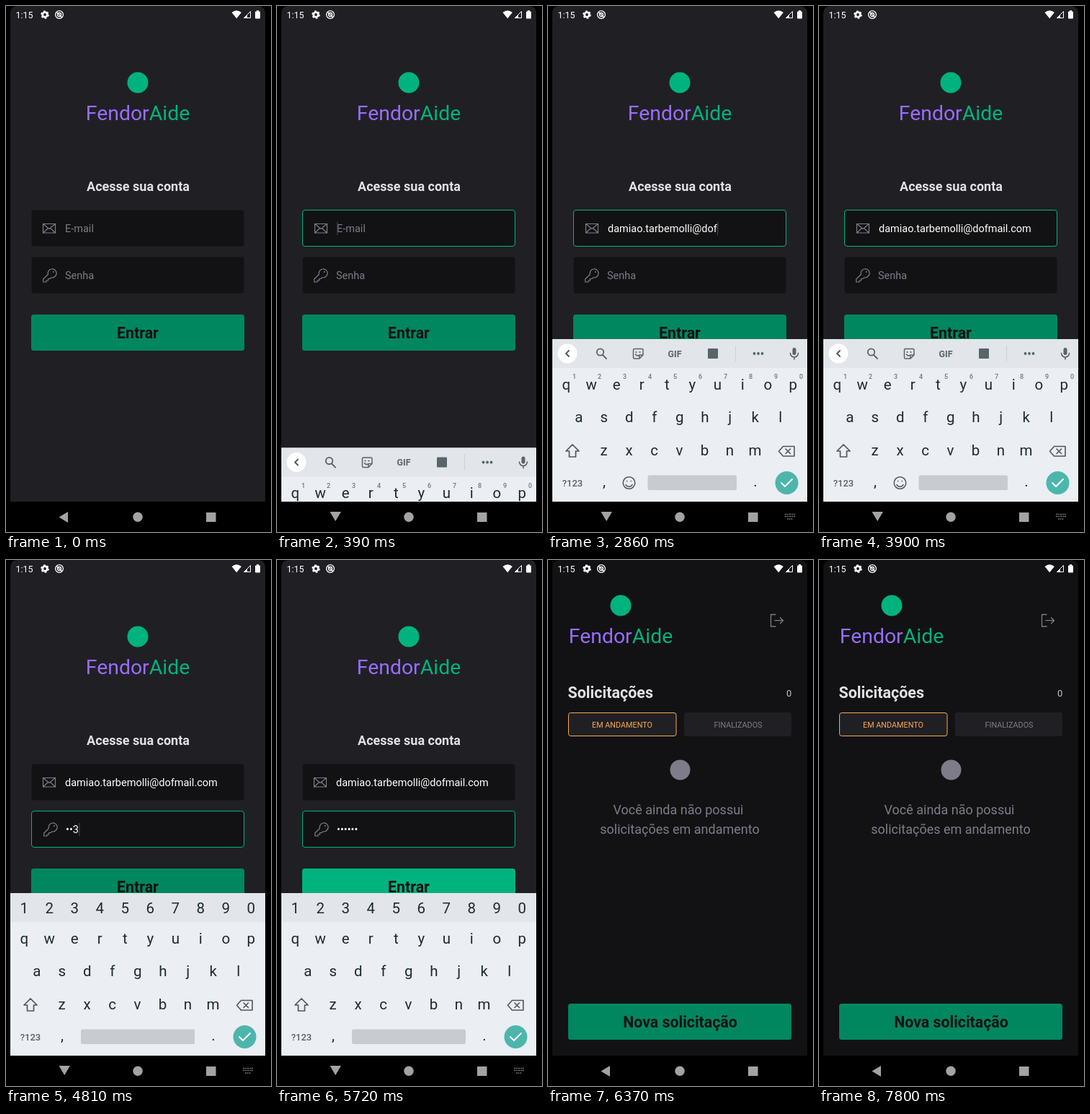
An HTML page for the animation above (8000 ms loop, 368 by 728 pixels).

```html
<!DOCTYPE html>
<html lang="pt-BR">
<head>
<meta charset="utf-8">
<title>Login</title>
<style>
  html, body { margin: 0; width: 100%; height: 100%; overflow: hidden; background: #000; }
  svg { display: block; width: 368px; height: 728px; font-family: Roboto, sans-serif; }
  .mid { text-anchor: middle; }
  .bold { font-weight: 700; }
  .brand { font-size: 28.4px; }
  .field { font-size: 14.5px; }
  .button { font-size: 21.3px; font-weight: 700; fill: #121214; }
  .tab { font-size: 10.8px; }
  .empty { font-size: 18px; }
  .key { font-size: 20.5px; fill: #1f2a30; }
  .hint { font-size: 9px; font-weight: 500; fill: #6d777d; }
  .small { font-size: 13px; font-weight: 500; fill: #566168; }
  .suggest { font-size: 16.4px; fill: #59646b; }
  .line { fill: none; stroke-linecap: round; stroke-linejoin: round; }
</style>
</head>
<body>
<svg viewBox="0 0 368 728">
  <defs>
    <clipPath id="screen"><path d="M6 686V11Q6 0 17 0H349Q360 0 360 11V686Z"/></clipPath>
    <g id="brand">
      <circle cx="183" cy="106" r="14.5" fill="#00b37e"/>
      <text class="brand mid" x="183" y="158"><tspan fill="#996dff">Fendor</tspan><tspan fill="#00b37e">Aide</tspan></text>
    </g>
  </defs>
  <rect width="368" height="728"/>

  <g clip-path="url(#screen)">
    <g id="login">
      <rect x="6" width="354" height="686" fill="#202024"/>
      <use href="#brand"/>
      <text class="mid bold" x="183.5" y="256" font-size="18" fill="#e1e1e6">Acesse sua conta</text>

      <rect id="emailBox" x="35.5" y="282.5" width="295" height="50" rx="3.5" fill="#121214"/>
      <g id="emailRow">
        <path class="line" d="M51.5 301.500h17v12.500h-17zl8.500 7 8.500-7M51.500 314l6.500-6M68.500 314l-6.500-6" stroke="#7c7c8a" stroke-width="1.2"/>
        <text id="email" class="field" x="82" y="313.300"></text>
      </g>

      <rect id="passBox" x="35.5" y="347.5" width="295" height="50" rx="3.5" fill="#121214"/>
      <g id="passRow">
        <path class="line" d="M58.300 371.500a6 6 0 1 1 4.400 4.300l-1.700 1.700h-2.500v2.500h-2.500v2h-4.300v-4z" stroke="#7c7c8a" stroke-width="1.2"/>
        <circle cx="65.800" cy="368" r="1" fill="#7c7c8a"/>
        <text id="pass" class="field" x="82" y="378.300"></text>
      </g>
      <rect id="underline" x="83" y="315" height="1" fill="#d5d5da"/>
      <rect id="cursor" width="1.2" height="18" fill="#3d4257"/>

      <rect id="enter" x="35" y="427" width="296" height="50" rx="3.5"/>
      <text class="button mid" x="183" y="460">Entrar</text>
    </g>

    <g id="home">
      <rect x="6" width="354" height="686" fill="#121214"/>
      <use href="#brand" x="-82" y="-43"/>
      <path class="line" d="M316 75.500h-6.500v16.500h6.500M315 83.700h11.500m-4-4 4 4-4 4" stroke="#7c7c8a" stroke-width="1.3"/>
      <text class="bold" x="27.500" y="191" font-size="21.5" fill="#e1e1e6">Solicitações</text>
      <text class="mid" x="334.700" y="189" font-size="13" fill="#c4c4cc">0</text>
      <rect x="28.500" y="211.500" width="149.500" height="32" rx="3" fill="#202024" stroke="#fba94c"/>
      <text class="tab mid" x="103" y="232" fill="#fba94c">EM ANDAMENTO</text>
      <rect x="189" y="211" width="149" height="33" rx="3.500" fill="#202024"/>
      <text class="tab mid" x="264" y="232" fill="#7c7c8a">FINALIZADOS</text>
      <circle cx="183.500" cy="290.500" r="14" fill="#7c7c8a"/>
      <g class="empty mid" fill="#7c7c8a">
        <text x="181" y="351.500">Você ainda não possui</text>
        <text x="183" y="379">solicitações em andamento</text>
      </g>
      <rect x="28" y="614" width="310" height="50" rx="3.500" fill="#00875f"/>
      <text class="button mid" x="183.500" y="646.700">Nova solicitação</text>
    </g>

    <g id="keyboard">
      <rect x="6" y="461" width="354" height="225" fill="#ebeef2"/>
      <rect x="6" y="461" width="354" height="40" fill="#e2e5e9"/>
      <g id="strip">
        <circle cx="27" cy="481" r="13.500" fill="#fff"/>
        <path id="toggle" class="line" stroke="#48545b" stroke-width="1.800"/>
        <g fill="#59646b">
          <rect x="339.500" y="473" width="5" height="10" rx="2.500"/>
          <path class="line" d="M336.500 480.500a5.500 5.500 0 0 0 11 0M342 486v3" stroke="#59646b" stroke-width="1.600"/>
        </g>
        <g id="suggest" class="suggest mid">
          <path d="M131.500 470v22M233.500 470v22" stroke="#cbd0d4"/>
          <text x="85" y="487"></text><text x="182" y="487"></text><text x="279" y="487"></text>
        </g>
        <g id="tools" fill="#59646b">
          <g class="line" stroke="#59646b" stroke-width="1.800">
            <path d="M76 483l5 5"/><circle cx="72.500" cy="479" r="4.700"/>
            <path d="M120 474.500h10.500q1.500 0 1.500 1.500v7l-5 5h-7q-1.500 0-1.500-1.500v-10.500q0-1.500 1.500-1.500zM127 488v-5h5M121.500 482q2 3 4.500 1.500" stroke-width="1.500"/>
          </g>
          <circle cx="122.500" cy="479" r="1.100"/><circle cx="127.500" cy="479" r="1.100"/>
          <text class="mid bold" x="176" y="485.500" font-size="12.500">GIF</text>
          <rect x="222" y="474" width="14" height="14" rx="1"/>
          <path d="M260.500 470v22" stroke="#cbd0d4"/>
          <circle cx="286.500" cy="481" r="1.900"/><circle cx="292" cy="481" r="1.900"/><circle cx="297.500" cy="481" r="1.900"/>
        </g>
      </g>
      <g id="digits"></g>
      <g id="letters">
        <g id="hints"></g>
        <path class="line" d="M34 607l9 9h-4.500v8h-9v-8H25z" stroke="#4d585f" stroke-width="1.700"/>
      </g>
      <g id="symbols"></g>
      <path class="line" d="M326.500 609.500h15.500v13.500h-15.500l-6-6.700zM330 613l6.500 6.500m0-6.500-6.500 6.500" stroke="#4d585f" stroke-width="1.600"/>
      <g id="smiley" class="line" stroke="#4d585f" stroke-width="1.500">
        <circle cx="112.500" cy="660" r="8.300"/><path d="M108 662.500a5 5 0 0 0 9 0M109.700 657.500v.2M115.300 657.500v.2"/>
      </g>
      <rect id="space" y="649.500" height="20.500" rx="2.500" fill="#c8cbcf"/>
      <g class="key mid"><text x="78" y="665">,</text><text x="288" y="665">.</text></g>
      <circle cx="331.500" cy="660" r="16" fill="#4db6ac"/>
      <path class="line" d="M324 660l5 5 10-10" stroke="#fff" stroke-width="1.900"/>
    </g>

    <g fill="#fff">
      <text x="13.500" y="17" font-size="12.500">1:15</text>
      <circle cx="54" cy="12" r="3.300" fill="none" stroke="#fff" stroke-width="2.800"/>
      <circle cx="54" cy="12" r="5" fill="none" stroke="#fff" stroke-width="1.600" stroke-dasharray="2.600 2.636"/>
      <g class="line" stroke="#fff" stroke-width="1.300">
        <circle cx="74" cy="12" r="5.400"/><circle cx="74" cy="12" r="2.500"/><path d="M71 9l6.500 6.500"/>
      </g>
      <path d="M313.500 9q6.700-5.500 13.400 0L320.200 17.300z"/>
      <path d="M339.500 7.500v9h-9z" fill="none" stroke="#fff"/><path d="M335 12v5h-5z"/>
      <path d="M346 8.500q0-1 1-1h1V6h3v1.500h1q1 0 1 1v8q0 1-1 1h-5q-1 0-1-1z"/>
    </g>
  </g>

  <g fill="#a3a3a3">
    <path id="back" d="M73.500 707.500L86 700v15z"/>
    <path id="down" d="M73.500 700h15.500l-7.800 13z"/>
    <circle cx="183" cy="707.300" r="6.700"/>
    <rect x="278" y="701" width="13.500" height="13"/>
    <path id="imeIcon" d="M329 703.500h14M329 706.500h14M332 710h8" stroke="#858585" stroke-width="1.500" stroke-dasharray="1.500 1"/>
  </g>
</svg>

<script>
const LOOP = 8000;
const EMAIL = "damiao.tarbemolli@dofmail.com";
const CODE = "123456";
const $ = id => document.getElementById(id);

// [time, number of characters typed]
const emailSteps = [[650, 1], [780, 2], [910, 4], [1040, 5], [1170, 6], [1300, 7], [1430, 9],
  [1560, 11], [1690, 13], [1820, 15], [1950, 17], [2470, 18], [2730, 19], [2860, 21],
  [2990, 22], [3120, 23], [3250, 25], [3380, 26], [3510, 27], [3640, 29]];
const passSteps = [[4550, 1], [4680, 2], [4810, 3], [4940, 4], [5070, 5], [5200, 6]];

const typed = (steps, t) => steps.reduce((n, [at, count]) => t >= at ? count : n, 0);
const within = (t, from, to) => t >= from && t < to;
const show = (id, on) => { $(id).style.display = on ? "" : "none"; };

function label(group, text, x, y, cls = "key") {
  const el = document.createElementNS("http://www.w3.org/2000/svg", "text");
  el.setAttribute("class", cls + " mid");
  el.setAttribute("x", x);
  el.setAttribute("y", y);
  el.textContent = text;
  $(group).append(el);
}

function row(group, chars, x, y) {
  [...chars].forEach((c, i) => label(group, c, x + 35 * i, y));
}

row("letters", "qwertyuiop", 25.3, 530.5);
row("letters", "asdfghjkl", 42.8, 576);
row("letters", "zxcvbnm", 77.5, 621.5);
label("letters", "?123", 34, 664.5, "small");
[..."1234567890"].forEach((c, i) => label("hints", c, 36.5 + 35 * i, 516, "hint"));
row("digits", "1234567890", 25.3, 489);
row("symbols", "1234567890", 25.3, 530.5);
row("symbols", "@#$_&-+()/", 25.3, 576);
row("symbols", "*\"':;!?", 77.5, 621.5);
label("symbols", "=\\<", 34, 620, "small");
label("symbols", "ABC", 34, 664.5, "small");

function paintField(name, value, hint, focused) {
  const text = $(name);
  text.textContent = value || hint;
  text.setAttribute("fill", value ? "#fff" : "#7c7c8a");
  $(name + "Box").setAttribute("stroke", focused ? "#00b37e" : "none");
  $(name + "Row").setAttribute("transform", `translate(${focused ? 1 : 0})`);
  return value ? text.getComputedTextLength() : 0;
}

function paintLogin(t) {
  const onEmail = within(t, 260, 4160), onPass = t >= 4160;
  const email = EMAIL.slice(0, typed(emailSteps, t));
  const count = typed(passSteps, t);
  const pass = t < 5720 ? "•".repeat(Math.max(0, count - 1)) + (count ? CODE[count - 1] : "") : "•".repeat(count);
  const emailWidth = paintField("email", email, "E-mail", onEmail);
  const passWidth = paintField("pass", pass, "Senha", onPass);

  const composing = email.length > 0 && email.length < 7;
  show("underline", composing);
  $("underline").setAttribute("width", emailWidth);
  show("cursor", within(t, 260, 5720) && !within(t, 2080, 2340) && !within(t, 3900, 4160));
  $("cursor").setAttribute("x", 83.3 + (onPass ? passWidth : emailWidth));
  $("cursor").setAttribute("y", onPass ? 364 : 299);
  $("enter").setAttribute("fill", within(t, 5720, 5980) ? "#00b37e" : "#00875f");
  paintKeyboard(t, composing, email);
}

function paintKeyboard(t, composing, email) {
  const rise = Math.min(1, Math.max(0, (t - 340) / 280));
  $("keyboard").setAttribute("transform", `translate(0 ${225 * (1 - rise) ** 2})`);

  const secret = t >= 4290, symbols = within(t, 2340, 2600);
  show("strip", !secret);
  show("digits", secret);
  show("hints", !secret);
  show("smiley", !secret);
  show("letters", !symbols);
  show("symbols", symbols);
  const left = secret ? 104 : 138.5;
  $("space").setAttribute("x", left);
  $("space").setAttribute("width", 262 - left);

  show("suggest", composing);
  show("tools", !composing);
  $("toggle").setAttribute("d", composing ? "M25 477l4 4-4 4" : "M29 477l-4 4 4 4");
  if (composing) {
    const capital = email[0].toUpperCase() + email.slice(1);
    const words = [email, capital, capital + "s"];
    $("suggest").querySelectorAll("text").forEach((el, i) => { el.textContent = words[i]; });
  }
}

function frame() {
  const t = performance.now() % LOOP;
  const home = t >= 6370, ime = within(t, 340, 6370);
  show("login", !home);
  show("home", home);
  show("keyboard", ime);
  show("back", !ime);
  show("down", ime);
  show("imeIcon", within(t, 600, 6240));
  if (!home) paintLogin(t);
  requestAnimationFrame(frame);
}
frame();
</script>
</body>
</html>
```
